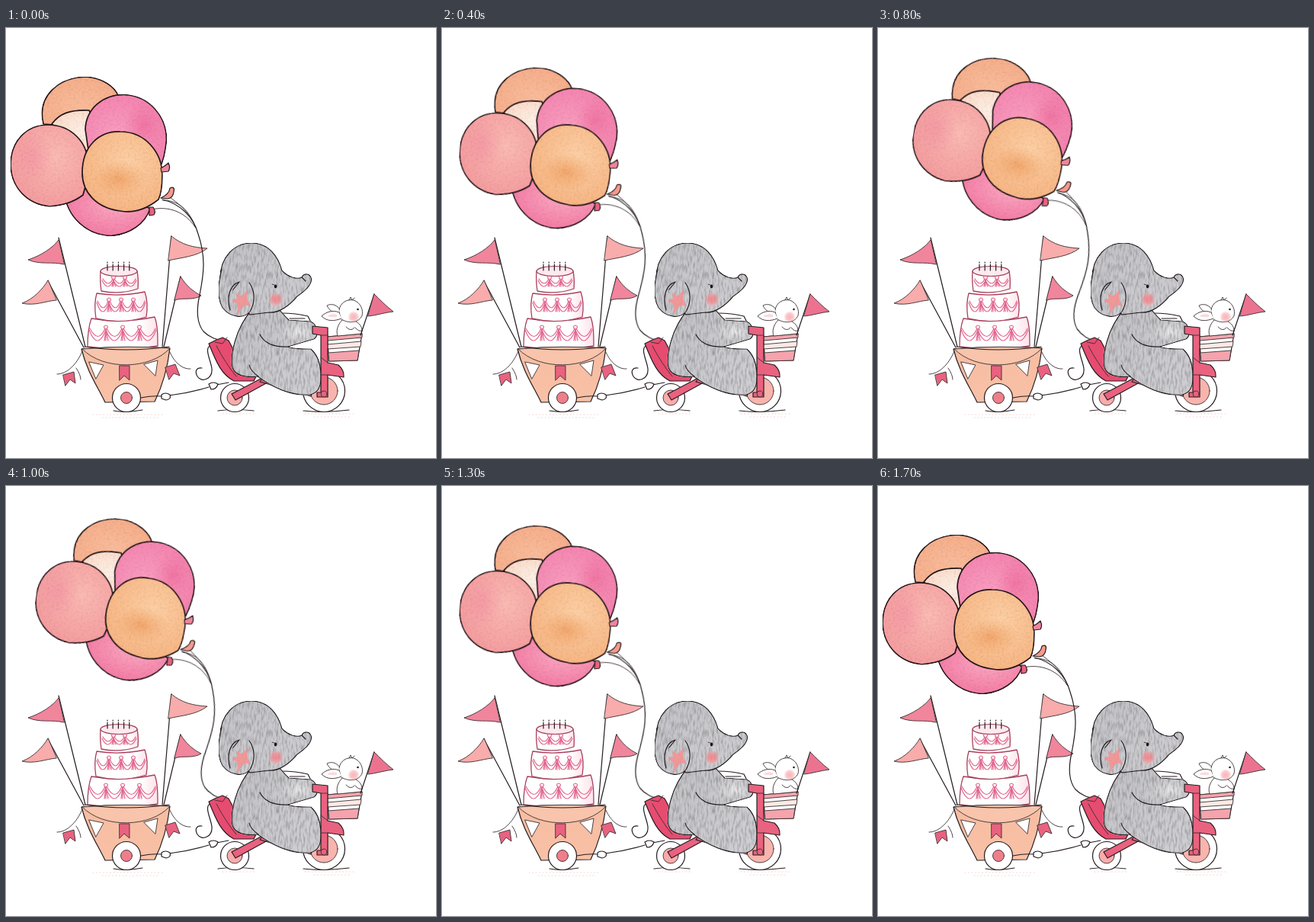
Write an HTML page that moves like this. It is 564x564 px and loops after 1800 ms.

```html
<!DOCTYPE html>
<html lang="en">
<head>
<meta charset="utf-8">
<title>Birthday ride</title>
<style>
  html, body { margin: 0; width: 100%; height: 100%; overflow: hidden; background: #fff; }
  svg { display: block; width: 100%; height: 100%; }
  path, circle, ellipse { stroke-linecap: round; stroke-linejoin: round; }
  .ink { stroke: #241c20; stroke-width: 1.2; fill: none; }
  .bold { stroke: #241418; stroke-width: 1.7; }
  .thin { stroke: #3a3034; stroke-width: .9; fill: none; }
  .icing { stroke: #e2668f; stroke-width: 1.2; fill: none; }
  .tier { stroke: #a8405c; stroke-width: 1.3; fill: url(#sponge); }
  .white { fill: #fff; }
  .hot { fill: #e9627f; }
  .rose { fill: #f0859b; }
  .blush { fill: #f8acab; }
  .stain { stroke: none; }
  #balloons { transform-origin: 280px 410px; }
</style>
</head>
<body>
<svg viewBox="0 0 564 564" xmlns="http://www.w3.org/2000/svg">
  <defs>
    <radialGradient id="peach" cx=".5" cy=".6" r=".7">
      <stop offset="0" stop-color="#f9bc9b"/><stop offset="1" stop-color="#f6ac88"/>
    </radialGradient>
    <radialGradient id="cream" cx=".6" cy=".5" r=".7">
      <stop offset="0" stop-color="#fef0e6"/><stop offset="1" stop-color="#fbd8c5"/>
    </radialGradient>
    <radialGradient id="pink" cx=".4" cy=".55" r=".7">
      <stop offset="0" stop-color="#fa9fc0"/><stop offset="1" stop-color="#f37eac"/>
    </radialGradient>
    <radialGradient id="low" cx=".6" cy=".4" r=".7">
      <stop offset="0" stop-color="#fba9c3"/><stop offset="1" stop-color="#f3749f"/>
    </radialGradient>
    <radialGradient id="salmon" cx=".6" cy=".4" r=".7">
      <stop offset="0" stop-color="#fbbab3"/><stop offset="1" stop-color="#f4999d"/>
    </radialGradient>
    <radialGradient id="orange" cx=".58" cy=".38" r=".7">
      <stop offset="0" stop-color="#fdcfa4"/><stop offset="1" stop-color="#f7b380"/>
    </radialGradient>
    <linearGradient id="tub" x2="0" y2="1">
      <stop offset="0" stop-color="#f7bda2"/><stop offset="1" stop-color="#f8c0a6"/>
    </linearGradient>
    <linearGradient id="gray" x2="1" y2="1">
      <stop offset="0" stop-color="#c2c2c6"/><stop offset="1" stop-color="#d0d0d4"/>
    </linearGradient>
    <linearGradient id="sponge">
      <stop offset="0" stop-color="#fff"/><stop offset=".75" stop-color="#fff"/><stop offset="1" stop-color="#fde2ea"/>
    </linearGradient>
    <radialGradient id="cheek">
      <stop offset="0" stop-color="#f77f86"/><stop offset=".6" stop-color="#f58f94" stop-opacity=".8"/><stop offset="1" stop-color="#f7a0a4" stop-opacity="0"/>
    </radialGradient>
    <radialGradient id="amber">
      <stop offset="0" stop-color="#ee9656"/><stop offset="1" stop-color="#f0a060" stop-opacity="0"/>
    </radialGradient>
    <radialGradient id="berry">
      <stop offset="0" stop-color="#ed5f92"/><stop offset="1" stop-color="#ee6c9c" stop-opacity="0"/>
    </radialGradient>
    <radialGradient id="light">
      <stop offset="0" stop-color="#fff"/><stop offset="1" stop-color="#fff" stop-opacity="0"/>
    </radialGradient>

    <filter id="paper" x="0" y="0" width="1" height="1" color-interpolation-filters="sRGB">
      <feTurbulence type="fractalNoise" baseFrequency=".35" numOctaves="2" seed="4"/>
      <feColorMatrix values=".16 0 0 0 .91  .16 0 0 0 .91  .16 0 0 0 .91  0 0 0 0 1"/>
      <feBlend in2="SourceGraphic" mode="multiply"/>
      <feComposite in2="SourceAlpha" operator="in"/>
    </filter>
    <filter id="streaks" x="0" y="0" width="1" height="1" color-interpolation-filters="sRGB">
      <feTurbulence type="fractalNoise" baseFrequency=".4 .1" numOctaves="2" seed="9"/>
      <feColorMatrix values=".55 0 0 0 .68  .55 0 0 0 .68  .55 0 0 0 .68  0 0 0 0 1"/>
      <feBlend in2="SourceGraphic" mode="multiply"/>
      <feComposite in2="SourceAlpha" operator="in"/>
    </filter>
  </defs>

  <g id="ground" fill="none" stroke="#f8d6d2" stroke-width="1.2" stroke-dasharray="1 3.5">
    <path d="M114 507H206M126 511H200M284 506H326M392 506H458M404 510H450"/>
  </g>
  <path class="ink" d="M141 502Q158 505 179 501M278 502Q300 499 325 502M390 502Q417 505 450 501"/>

  <g id="flags">
    <path class="ink" d="M69 275L104 418M55 332L102 419M217 273L205 418M229 326L207 418"/>
    <path class="thin rose" d="M69 278C62 288 45 299 29 304C45 311 60 306 76 310Z"/>
    <path class="thin blush" d="M55 331C48 343 35 356 21 361C38 365 52 358 66 357Z"/>
    <path class="thin blush" d="M217 273C230 284 245 288 264 289C250 300 230 301 213 305Z"/>
    <path class="thin rose" d="M229 326C236 338 246 346 256 351C245 358 232 353 221 357Z"/>
  </g>

  <g id="cake">
    <path class="tier" d="M112 381C108 392 107 406 107 418Q152 424 199 417C199 403 199 390 195 379Q152 388 112 381Z"/>
    <path class="tier" d="M119 348Q115 362 118 381Q150 389 184 379Q187 360 182 346Q150 353 119 348Z"/>
    <path class="tier" d="M124 319Q123 331 125 345Q149 350 173 342Q174 329 172 319Z"/>
    <ellipse class="icing" style="fill:#fde9ee;stroke:#9c4058" cx="148" cy="319" rx="24" ry="6.5"/>
  </g>

  <g id="cart">
    <path class="ink" style="fill:url(#tub)" d="M99 421Q157 417 215 420C212 445 205 470 195 490L130 491C120 470 106 450 99 421Z"/>
    <path class="thin" style="fill:#f8c4ab" d="M100 421Q157 416 215 420C190 448 128 450 100 421Z"/>
    <path class="ink" d="M103 418Q157 426 214 418"/>
    <path class="thin" d="M100 424C93 441 80 454 67 454M92 446Q98 455 98 461M214 423C220 438 231 448 242 447"/>
    <path class="thin hot" d="M75 455L89 451L91 466L84 461L78 469Z"/>
    <path class="thin hot" d="M209 445L222 441L228 456L220 453L214 461Z"/>
    <path class="thin white" d="M109 438L128 442L118 460ZM181 441L199 436L196 456Z"/>
    <path class="thin hot" d="M149 443H162V462L155 456L149 462Z"/>
    <circle class="ink white" cx="158" cy="485" r="18.5"/>
    <circle class="thin" style="fill:#ef7e8b" cx="158" cy="485" r="7.5"/>
    <path class="ink" d="M177 485Q192 482 204 483M214 482Q240 479 266 471M276 468L292 465"/>
    <path class="ink white" d="M204 481Q209 477 215 481Q217 487 210 488L204 486ZM266 467Q272 463 278 467Q276 474 269 474Z"/>
  </g>

  <g id="balloons">
    <g class="thin">
      <path d="M191 238C213 233 235 241 248 261M206 226C226 226 240 238 249 262M210 219C228 230 242 244 249 262"/>
    </g>
    <path class="ink" d="M205 225C228 230 246 248 252 270C262 300 260 320 254 350C249 372 251 388 259 398C267 406 275 408 283 410"/>
    <g class="bold" filter="url(#paper)">
      <path fill="url(#peach)" d="M49 126C40 88 70 65 105 64C127 66 142 76 148 90L110 130Z"/>
      <path fill="url(#cream)" d="M60 126C70 112 84 107 109 108L125 140L105 162Z"/>
      <path fill="url(#low)" d="M76 213C79 249 107 272 138 272.500C163 271 183 256 189 237L150 215L105 205Z"/>
      <path fill="url(#pink)" d="M104 133C105 106 127 87 155 87.500C190 89 211 118 210.500 147C209 163 206 175 202 183L150 190L108 160Z"/>
      <ellipse class="stain" fill="url(#berry)" opacity=".55" cx="180" cy="128" rx="26" ry="32"/>
      <path fill="url(#salmon)" d="M6 180C6 147 28 127 55 127C85 127 108 150 107 178C107 198 103 213 101 219C88 229 73 233 57 234C28 231 7 210 6 180Z"/>
      <ellipse class="stain" fill="url(#berry)" opacity=".22" cx="36" cy="170" rx="26" ry="34"/>
      <path fill="url(#orange)" d="M100 190C100 155 122 135 150 136C184 136 205 165 205 193C205 205 204 217 200 225C185 237 167 243 150 240C118 236 100 215 100 190Z"/>
      <ellipse class="stain" fill="url(#amber)" opacity=".65" cx="148" cy="198" rx="36" ry="24"/>
    </g>
    <g class="ink">
      <path class="rose" d="M203 184Q209 181 213 177Q216 183 213 188L204 189Z"/>
      <path style="fill:#f59a8c" d="M203 223Q214 218 215 210Q222 207 220 215Q219 223 212 224Z"/>
      <path class="hot" d="M188 235L193 235Q197 241 194 245L188 246Z"/>
    </g>
  </g>

  <g id="trike">
    <path class="ink" d="M270 416C258 418 269 436 270 447C271 460 257 466 251 457C247 450 250 445 257 446"/>
    <circle class="ink white" cx="300" cy="485" r="18.5"/>
    <circle class="thin blush" cx="300" cy="485" r="10"/>
    <circle class="ink white" cx="417" cy="476" r="27.5"/>
    <circle class="thin" style="fill:#f8b4ad" cx="417" cy="476" r="18"/>
    <path class="ink" style="fill:#e64c70" d="M266 414Q275 409 284 406L292 410L300 425L303 453L328 457L325 463L299 463C283 455 276 439 266 414Z"/>
    <path class="thin" d="M276 417Q288 440 302 457M274 412L284 414L290 406"/>
    <path class="ink hot" d="M296 480L336 459L343 465L301 488ZM338 457L402 476L400 483L333 464Z"/>
    <path class="ink white" d="M421 405L467 401L461 436L424 437Z"/>
    <path class="thin" style="fill:#f5a3ac" d="M421 405L467 401L467 406L422 410ZM423 426L463 423L461 436L424 437Z"/>
    <path class="thin" style="fill:#fdeae4" d="M422 415L466 411L465 418L422 421Z"/>
  </g>

  <g id="bunny">
    <path class="thin white" d="M441 383C434 390 433 398 435 404L466 401C469 393 464 388 459 385Z"/>
    <path class="thin white" d="M438 369C432 361 425 362 421 364C424 371 430 374 437 375Z"/>
    <path class="thin white" d="M437 373C428 369 419 373 414 378C421 385 430 385 440 381Z"/>
    <path d="M434 376Q426 374 421 378Q427 380 434 379Z" fill="#fbd9dd"/>
    <path class="thin white" d="M437 370C438 360 448 355 456 357C465 360 469 370 467 377C463 387 449 388 440 382"/>
    <path class="thin" d="M450 357L452 353L454 357L457 354M446 392Q452 399 457 393M458 393Q463 399 467 397"/>
    <circle cx="456" cy="379" r="8" fill="url(#cheek)" opacity=".6"/>
    <circle cx="461.5" cy="369" r="1.3" fill="#241c20"/>
    <path class="ink" d="M465 403L483 349"/>
    <path class="thin" style="fill:#ec7390" d="M483 349C490 356 500 366 508 372C497 373 486 377 475 378Z"/>
  </g>

  <g id="elephant">
    <path class="ink" d="M362 374Q380 374 396 378L401 388M372 381L392 381"/>
    <g class="ink" filter="url(#streaks)">
      <path fill="url(#gray)" d="M322 370C300 395 294 430 297 445C300 456 315 459 330 457C350 472 375 483 398 481C412 479 414 465 413 452C412 437 408 428 400 421C388 421 375 421 370 418L404 408C411 403 409 390 400 385L371 383C366 378 360 372 358 368Z"/>
      <ellipse class="stain" fill="url(#light)" opacity=".6" cx="384" cy="398" rx="24" ry="12"/>
      <path fill="url(#gray)" d="M281 330C280 300 300 282 322 282C345 282 357 300 362 318C370 327 382 330 388 327C390 322 397 321 400 327C403 336 391 346 382 352C370 366 358 374 345 373L320 376Z"/>
      <path fill="url(#gray)" d="M283 316C278 335 277 355 284 367C294 380 312 382 320 372C327 360 327 345 319 334"/>
    </g>
    <path d="M302 347L309 352L317 343L316 355L321 365L312 363L304 375L303 362L296 357L303 355Z" fill="#f78f8f" opacity=".85"/>
    <path class="ink" d="M306 333C293 337 289 354 294 370M306 333L298 343M333 402C339 414 353 419 371 418M331 457C324 452 320 447 319 442M388 327L393 332"/>
    <circle cx="354" cy="356" r="10" fill="url(#cheek)" opacity=".85"/>
    <ellipse cx="353.5" cy="339" rx="1.8" ry="2.4" fill="#1c1618"/>
    <path class="thin" d="M349 336L352 337"/>
  </g>

  <g id="fork">
    <path class="ink hot" d="M402 391L422 393V439L436 442Q444 449 443 458L422 455V484H408V478H413V403L402 401Z"/>
    <path class="thin" d="M413 403H422M413 432L422 439M413 455H422"/>
    <circle class="thin hot" cx="417" cy="480" r="4"/>
  </g>
</svg>

<script>
  const $ = s => document.querySelector(s);
  const cake = $('#cake');

  function addPath(d, cls) {
    const p = document.createElementNS('http://www.w3.org/2000/svg', 'path');
    p.setAttribute('d', d);
    p.setAttribute('class', cls);
    cake.append(p);
  }

  // Garlands with a looped tassel at every join.
  function swags(x0, x1, y, n, h) {
    const w = (x1 - x0) / n;
    for (let i = 0; i < n; i++) {
      const x = x0 + i * w;
      addPath(`M${x} ${y}q${w / 2} ${h * 2} ${w} 0M${x + 1} ${y - 2}q${w / 2} ${h * 1.5} ${w - 2} 0`, 'icing');
      if (i) addPath(`M${x} ${y}q-5 -5 0 -6q5 1 0 6l-2 ${h}m2 ${-h}l3 ${h}m-3 ${-h}v${h}`, 'icing');
    }
  }
  swags(109, 197, 396, 4, 14);
  swags(119, 183, 360, 4, 12);
  swags(126, 171, 331, 3, 8);
  for (let x = 133; x < 164; x += 7.2) addPath(`M${x} 318v-8m0 -2v-1`, 'ink');

  // Sway: out, a short rest, and back, in 100 ms holds.
  const angles = [0, 1, 2, 3.05, 4.1, 5.15, 6.2, 7.7, 9.2];
  const count = 18;
  const frames = Array.from({ length: count + 1 }, (_, i) => ({
    offset: i / count,
    transform: `rotate(${angles[Math.max(0, Math.min(i, count - 1 - i))]}deg)`,
    easing: 'steps(1, end)'
  }));
  $('#balloons').animate(frames, { duration: 1800, iterations: Infinity });
</script>
</body>
</html>
```
